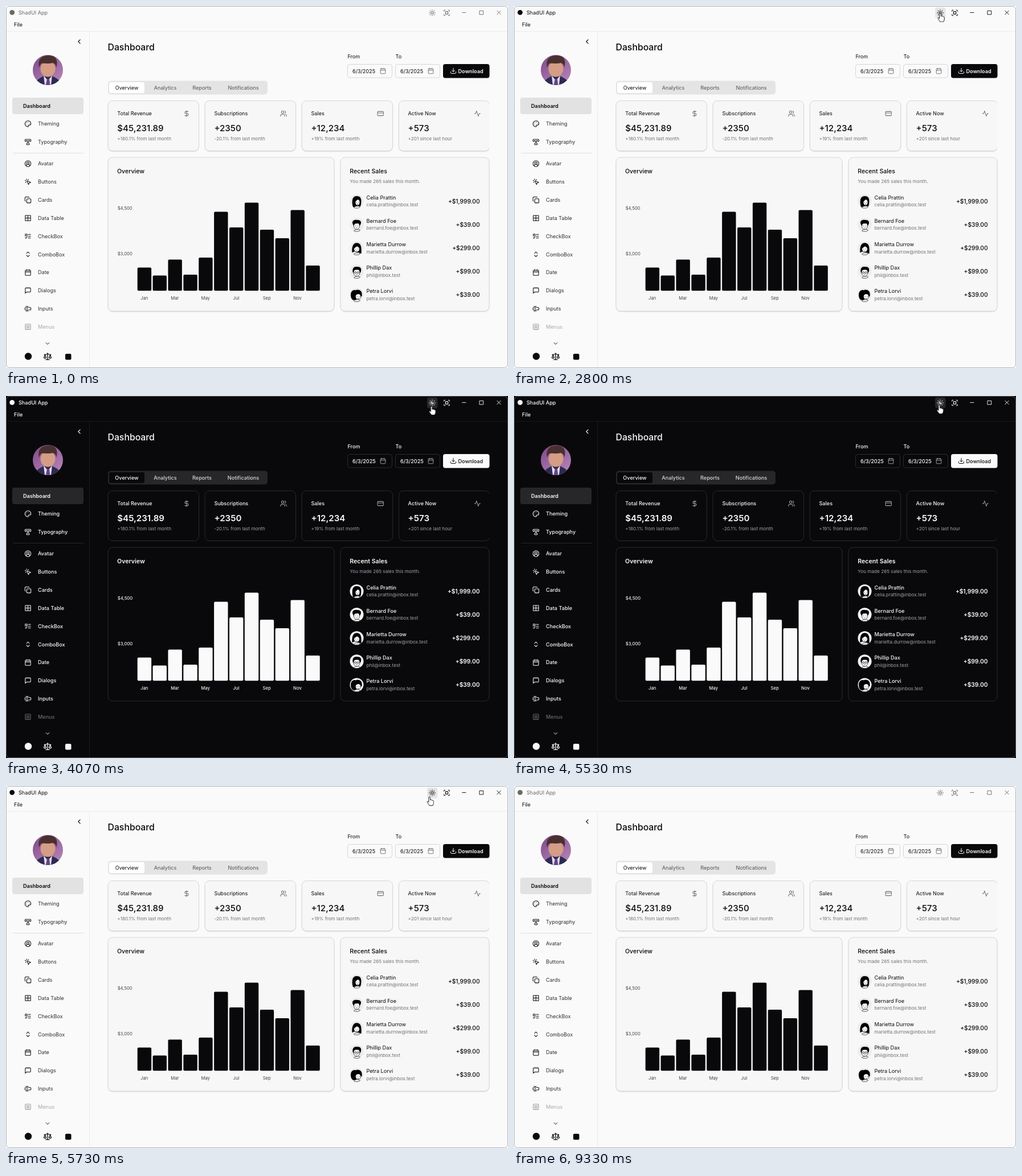
An HTML page for the animation above (9800 ms loop, 881 by 636 pixels).

```html
<!DOCTYPE html>
<html lang="en">
<head>
<meta charset="utf-8">
<title>Dashboard</title>
<style>
html, body { margin: 0; width: 100%; height: 100%; overflow: hidden; }
svg { display: block; width: 881px; height: 636px; font: 400 9.1px Inter, "Open Sans", sans-serif; animation: theme 9.8s step-end infinite; }
text { fill: var(--fg); font-weight: var(--body); }
.nav { fill: var(--nav); }
.small { font-size: 8.2px; font-weight: 400; fill: var(--mut); }
.axis { font-size: 7.7px; fill: var(--axis); }
.h1 { font-size: 15.8px; font-weight: 500; }
.h2 { font-size: 10.6px; font-weight: var(--head); }
.big { font-size: 15.1px; font-weight: var(--head); }
.sum { font-size: 10.2px; font-weight: var(--head); }
.mid { text-anchor: middle; }
.end { text-anchor: end; }
.bold { font-weight: 600; }
.inv { fill: var(--bg); font-weight: var(--button); }
.ic { fill: none; stroke: var(--fg); stroke-width: 2; stroke-linecap: round; stroke-linejoin: round; }
.ic.soft { stroke: var(--mut); }
.ic.flip { stroke: var(--bg); }
.fg { fill: var(--fg); }
.card { fill: var(--card); stroke: var(--edge); }
.shade { fill: var(--shade); }
.line { fill: none; stroke: var(--line); }
.field { fill: var(--bg); stroke: var(--edge); }
.faded { opacity: .4; }

.focus { animation: focus 9.8s step-end infinite; }
.hover { fill: var(--hover); animation: hover 9.8s step-end infinite; }
.sun { animation: sun 9.8s step-end infinite; }
.moon { animation: moon 9.8s step-end infinite; }
.dusk { animation: dusk 9.8s step-end infinite; }
.pick { animation: pick 9.8s linear infinite; }
.cursor { animation: move 9.8s linear infinite, show 9.8s step-end infinite; }
.arrow { animation: arrow 9.8s step-end infinite; }
.hand { animation: hand 9.8s step-end infinite; }
.cursor path { fill: #fff; stroke: #000; stroke-width: .9; stroke-linejoin: round; }

@keyframes theme {
  0%, 57.14%, 100% {
    --bg: #fafafa; --fg: #09090b; --nav: #2f2f34; --mut: #71717a; --axis: #45454c;
    --card: #f7f7f7; --edge: #d6d6d9; --shade: #00000016; --line: #ececee; --rule: #dedee0;
    --tab: #e4e4e5; --tabon: #fff; --tabfg: #52525b; --hover: #e6e6e7; --win: #b4b4b4; --face: #ebebeb;
    --body: 400; --head: 500; --button: 600;
  }
  29.28% {
    --bg: #09090b; --fg: #fafafa; --nav: #fafafa; --mut: #a1a1aa; --axis: #f0f0f2;
    --card: #09090b; --edge: #2b2b2f; --shade: #0000; --line: #18181b; --rule: #27272a;
    --tab: #27272a; --tabon: #09090b; --tabfg: #dadade; --hover: #27272a; --win: #5a5a5c; --face: #f4f4f5;
    --body: 500; --head: 600; --button: 500;
  }
}
@keyframes focus { 0%, 95.2%, 100% { opacity: .6 } 27.85% { opacity: 1 } }
@keyframes hover { 0%, 95.2%, 100% { opacity: 0 } 27.85% { opacity: 1 } }
@keyframes sun { 0%, 57.14%, 100% { opacity: 1 } 29.28% { opacity: 0 } }
@keyframes moon { 0%, 40.8%, 100% { opacity: 0 } 29.28% { opacity: 1 } }
@keyframes dusk { 0%, 57.14%, 100% { opacity: 0 } 40.8% { opacity: 1 } }
@keyframes pick {
  0%, 29.279% { fill: #e2e2e2 }
  29.28% { fill: #121214 }
  31%, 57.139% { fill: #27272a }
  57.14% { fill: #f7f7f7 }
  58.47%, 100% { fill: #e2e2e2 }
}
@keyframes show { 0%, 87.04%, 100% { opacity: 0 } 8.16% { opacity: 1 } }
@keyframes arrow { 0%, 83.4%, 100% { opacity: 1 } 22% { opacity: 0 } }
@keyframes hand { 0%, 83.4%, 100% { opacity: 0 } 22% { opacity: 1 } }
@keyframes move {
  0%, 8.16% { transform: translate(154.5px, 618px); animation-timing-function: cubic-bezier(.4, 0, .4, 1) }
  17.65%, 18.37% { transform: translate(707.5px, 45.5px); animation-timing-function: ease-in-out }
  23.16%, 29.9% { transform: translate(748px, 12.5px) }
  33.98%, 36.02% { transform: translate(746.5px, 17px) }
  37.1% { transform: translate(747px, 25.5px) }
  38.06%, 39.49% { transform: translate(747px, 19.5px) }
  44.18%, 57.14% { transform: translate(746.2px, 16px) }
  58.47%, 82.96% { transform: translate(743.2px, 19px); animation-timing-function: ease-in }
  86.4%, 100% { transform: translate(121.5px, 600px) }
}
</style>
</head>
<body>
<svg id="app" viewBox="0 0 881 636"></svg>
<script>
const box = 'a2 2 0 0 1 2 2v14a2 2 0 0 1-2 2H5a2 2 0 0 1-2-2V';
const rays = 'M12 2v2M12 20v2M4.9 4.9l1.4 1.4M17.7 17.7l1.4 1.4M2 12h2M20 12h2M6.3 17.7l-1.4 1.4M19.1 4.9l-1.4 1.4';
const ring = (x, y, r) => `M${x - r} ${y}a${r} ${r} 0 1 0 ${2 * r} 0a${r} ${r} 0 1 0 ${-2 * r} 0`;
const icons = {
  palette: 'M13.5 6.5h.01M17.5 10.5h.01M8.5 7.5h.01M6.5 12.5h.01M12 2C6.5 2 2 6.5 2 12s4.5 10 10 10c.9 0 1.6-.7 1.6-1.7 0-1-.8-1.2-.8-2.2 0-1 .7-1.7 1.7-1.7h2c3 0 5.5-2.5 5.5-5.5C22 6 17.5 2 12 2z',
  type: 'M14 16.5a.5.5 0 0 0 .5.5h.5a2 2 0 0 1 0 4H9a2 2 0 0 1 0-4h.5a.5.5 0 0 0 .5-.5v-9a.5.5 0 0 0-.5-.5h-3a.5.5 0 0 0-.5.5V8a2 2 0 0 1-4 0V5a2 2 0 0 1 2-2h16a2 2 0 0 1 2 2v3a2 2 0 0 1-4 0v-.5a.5.5 0 0 0-.5-.5h-3a.5.5 0 0 0-.5.5Z',
  user: 'M18 20a6 6 0 0 0-12 0' + ring(12, 10, 4) + ring(12, 12, 10),
  click: 'M14 4.1 12 6M5.1 8l-2.9-.8M6 12l-1.9 2M7.2 2.2 8 5.1M9 9.7a.5.5 0 0 1 .7-.7l11 4.5a.5.5 0 0 1-.1 1l-4.3 1a1 1 0 0 0-.8.8l-1 4.3a.5.5 0 0 1-1 .1z',
  copy: 'M10 8h10a2 2 0 0 1 2 2v10a2 2 0 0 1-2 2H10a2 2 0 0 1-2-2V10a2 2 0 0 1 2-2zM4 16c-1.1 0-2-.9-2-2V4c0-1.1.9-2 2-2h10c1.1 0 2 .9 2 2',
  table: 'M3 3h18v18H3zM12 3v18M3 12h18',
  todo: 'M3 5h6v6H3zM3 17l2 2 4-4M13 6h8M13 12h8M13 18h8',
  updown: 'M7 15l5 5 5-5M7 9l5-5 5 5',
  calendar: 'M8 2v4M16 2v4M3 10h18M5 4h14' + box + '6a2 2 0 0 1 2-2z',
  message: 'M21 15a2 2 0 0 1-2 2H7l-4 4V5a2 2 0 0 1 2-2h14a2 2 0 0 1 2 2z',
  input: 'M5 4h1a3 3 0 0 1 3 3 3 3 0 0 1 3-3h1M13 20h-1a3 3 0 0 1-3-3 3 3 0 0 1-3 3H5M5 16H4a2 2 0 0 1-2-2v-4a2 2 0 0 1 2-2h1M13 8h7a2 2 0 0 1 2 2v4a2 2 0 0 1-2 2h-7M9 7v10',
  menu: 'M5 3h14' + box + '5a2 2 0 0 1 2-2zM7 8h10M7 12h10M7 16h10',
  scales: 'M16 16l3-8 3 8c-1.8 1.3-4.2 1.3-6 0ZM2 16l3-8 3 8c-1.8 1.3-4.2 1.3-6 0ZM7 21h10M12 3v18M3 7h2c2 0 5-1 7-2 2 1 5 2 7 2h2',
  dollar: 'M12 2v20M17 5H9.5a3.5 3.5 0 0 0 0 7h5a3.5 3.5 0 0 1 0 7H6',
  users: 'M16 21v-2a4 4 0 0 0-4-4H6a4 4 0 0 0-4 4v2M22 21v-2a4 4 0 0 0-3-3.9M16 3.1a4 4 0 0 1 0 7.8' + ring(9, 7, 4),
  credit: 'M4 5h16a2 2 0 0 1 2 2v10a2 2 0 0 1-2 2H4a2 2 0 0 1-2-2V7a2 2 0 0 1 2-2zM2 10h20',
  activity: 'M22 12h-4l-3 9L9 3l-3 9H2',
  download: 'M21 15v4a2 2 0 0 1-2 2H5a2 2 0 0 1-2-2v-4M7 10l5 5 5-5M12 15V3',
  full: 'M3 7V5a2 2 0 0 1 2-2h2M17 3h2a2 2 0 0 1 2 2v2M21 17v2a2 2 0 0 1-2 2h-2M7 21H5a2 2 0 0 1-2-2v-2M8 8h8v8H8z',
  sun: ring(12, 12, 4) + rays,
  moon: 'M12 3a6 6 0 0 0 9 9 9 9 0 1 1-9-9Z',
  dusk: 'M12 8a2.8 2.8 0 0 0 4 4 4 4 0 1 1-4-4' + rays,
  left: 'M15 18l-6-6 6-6',
  down: 'M6 9l6 6 6-6',
  min: 'M5 12h14',
  max: 'M5 5h14v14H5z',
  close: 'M5 5l14 14M19 5 5 19'
};

const text = (x, y, s, cls = '') => `<text x="${x}" y="${y}" class="${cls}">${s}</text>`;
const rect = (x, y, w, h, r, attr) => `<rect x="${x}" y="${y}" width="${w}" height="${h}" rx="${r}" ${attr}/>`;
const line = (d, color = 'line') => `<path d="${d}" class="line" style="stroke:var(--${color})"/>`;
const icon = (name, x, y, size = 12.4, cls = '') =>
  `<path d="${icons[name]}" class="ic ${cls}" transform="translate(${x - size / 2} ${y - size / 2}) scale(${size / 24})"/>`;
const card = (x, y, w, h) => rect(x - .5, y + 1, w + 1, h + 1, 9, 'class="shade"') + rect(x, y, w, h, 8, 'class="card"');

function titleBar() {
  return rect(739, 2.5, 18.5, 19, 4, 'class="hover"') +
    '<g class="focus"><circle cx="10.7" cy="11.3" r="4.4" class="fg"/>' + text(22, 14.7, 'ShadUI App') +
    ['sun', 'moon', 'dusk'].map(n => icon(n, 748, 12, 12.8, n)).join('') +
    icon('full', 773.5, 12, 12.8) + icon('min', 803.8, 11.5, 11) + icon('max', 834.5, 11.7, 11) + icon('close', 865, 11.5, 11) +
    '</g>' + text(14, 36, 'File') + line('M1 44.5H880M146.5 45V635');
}

function portrait() {
  return `<g clip-path="url(#round)"><rect x="46" y="85" width="55" height="55" fill="url(#mauve)"/>
    <path d="M50 141C51 130 59 127 66 123L81 123C89 127 96 130 98 141Z" fill="#2e2b52"/>
    <path d="M66 122L73.5 131 81 122 79 139H68Z" fill="#e4dcea"/><path d="M72 128h4l1.5 12h-8z" fill="#65438c"/>
    <ellipse cx="73.5" cy="110.5" rx="13" ry="14" fill="#d59c86"/>
    <path d="M58 108C55 93 63 87 75 87S92 94 88.5 108C87 103 86 101 82 100 74 102 66 100 62 101 60 103 59 105 58 108Z" fill="#49302f"/></g>`;
}

function sidebar() {
  const items = ['Avatar user', 'Buttons click', 'Cards copy', 'Data_Table table', 'CheckBox todo', 'ComboBox updown',
    'Date calendar', 'Dialogs message', 'Inputs input', 'Menus menu'];
  const row = (s, y) => {
    const [label, name] = s.split(' ');
    return `<g class="${label == 'Menus' ? 'faded' : ''}">` + icon(name, 38.5, y) + text(56, y + 3.3, label.replace('_', ' '), 'nav') + '</g>';
  };
  return icon('left', 128.5, 62.5, 13.5) + portrait() +
    rect(11, 161, 125, 29, 4, 'class="pick"') + text(30, 178.5, 'Dashboard', 'bold') +
    row('Theming palette', 207) + row('Typography type', 239) + line('M12 258.5H136', 'rule') +
    items.map((s, i) => row(s, 277 + 31.86 * i)).join('') +
    icon('down', 73, 593, 11.5) + '<circle cx="39" cy="615.5" r="6.2" class="fg"/>' +
    icon('scales', 73, 615.5, 15.5) + rect(104, 611, 10.5, 10.5, 2, 'class="fg"');
}

function header() {
  const date = (x, label) => text(x, 92, label) + rect(x, 102.5, 78, 23.5, 4, 'class="field"') +
    text(x + 8.5, 117.5, '6/3/2025') + icon('calendar', x + 62, 114, 11.5, 'soft');
  const tabs = [[212, 'Overview'], [279.5, 'Analytics'], [344, 'Reports'], [416.5, 'Notifications']];
  return text(178.5, 77.7, 'Dashboard', 'h1') + date(599.5, 'From') + date(683.5, 'To') +
    rect(767, 102, 81.5, 24.5, 4, 'class="fg"') + icon('download', 785, 114, 12, 'flip') + text(793.5, 117.5, 'Download', 'inv') +
    rect(179, 131.5, 280, 24, 5, 'style="fill:var(--tab)"') + rect(181, 134, 62, 19, 3, 'style="fill:var(--tabon)"') +
    tabs.map(([x, s], i) => `<text x="${x}" y="146.8" class="mid" style="fill:var(--${i ? 'tabfg' : 'fg'})">${s}</text>`).join('');
}

function stats() {
  const list = [
    ['Total Revenue', '$45,231.89', '+180.1% from last month', 'dollar'],
    ['Subscriptions', '+2350', '-20.1% from last month', 'users'],
    ['Sales', '+12,234', '+19% from last month', 'credit'],
    ['Active Now', '+573', '+201 since last hour', 'activity']];
  return '<g clip-path="url(#view)">' + list.map(([name, value, note, pic], i) => {
    const x = 179 + 170.1 * i;
    return card(x, 166.5, 159.5, 88) + text(x + 16.3, 192.4, name) + text(x + 16.3, 220.4, value, 'big') +
      text(x + 16.3, 235.8, note, 'small') + icon(pic, x + 138, 189, 12.4, 'soft');
  }).join('') + '</g>';
}

function chart() {
  const tops = [459.5, 473.5, 445.5, 472, 442, 361.5, 389, 345.5, 393, 408, 358.5, 456];
  const bars = tops.map((y, i) => rect(230.7 + 26.88 * i, y, 24.4, 500.3 - y, 2, 'class="fg"')).join('');
  const months = ['Jan', 'Mar', 'May', 'Jul', 'Sep', 'Nov'].map((m, i) => text(242.7 + 53.75 * i, 516.2, m, 'axis mid')).join('');
  return card(179, 266, 397, 270) + text(195, 293.5, 'Overview', 'h2') +
    text(195.7, 358, '$4,500', 'axis') + text(195.7, 437.8, '$3,000', 'axis') + bars + months;
}

// Each head: hair behind, face ellipse, fringe, all around 0,0.
const heads = [
  ['M-7 9C-9-1-8-9 0-9S9-3 7 8L3 11H-5Z', [1.5, 2, 4, 5.2], 'M-3 1C0-1 2-3 2.5-5 5-4 6-1 6 2L7-3 1-8-4-4Z'],
  ['M-7-1C-9-7-4-9 1-8 5-9 9-6 7-1L5 3H-5Z', [0, 2.5, 5, 6], 'M-6 0C-3-3 3-1 6-3L6-6-5-6Z'],
  ['M-8 8C-9-5-5-9 0-9 7-9 9-3 8 10L4 8-4 6Z', [0, 2, 4.8, 5], 'M-5 1C-2-1 1-4 2-5 3-3 5-1 6 1L6-5-3-7Z'],
  ['M-7 1C-8-6-4-9 1-8 7-9 9-4 7 1L5 4H-5Z', [0, 2, 5.5, 6.5], 'M-6-1C-2-4 2-2 6-3L4-6-4-6Z'],
  ['M-10 4C-12-3-8-10-2-8 3-11 10-7 9-1 10 2 8 3 7 4L-3 9C-7 10-9 8-10 4Z', [2.5, 3, 4.5, 5], 'M-3 2C-1-2 4-1 7-1L6-5-3-4Z']
];
function head([hair, [x, y, rx, ry], fringe], i, cy) {
  const eyes = i == 3 ? ring(-2.2, 2, 1.6) + ring(2.2, 2, 1.6) : `M${x - 2.4} ${y}h1.2M${x + 1.4} ${y}h1.2`;
  return `<g transform="translate(615.5 ${cy})"><circle r="12" style="fill:var(--face)"/>
    <path d="${hair}"/><path d="M-5 11C-3 8 4 8 6 10L3 12H-3Z" fill="#fff" stroke="#111" stroke-width=".7"/>
    <ellipse cx="${x}" cy="${y}" rx="${rx}" ry="${ry}" fill="#fff" stroke="#111" stroke-width=".7"/>
    <path d="${fringe}"/><path d="${eyes}M${x - 1} ${y + 3}q1 .8 2.2 0" fill="none" stroke="#111" stroke-width=".8"/></g>`;
}

function sales() {
  const people = [
    ['Celia Prattin', 'celia.prattin', '1,999'], ['Bernard Foe', 'bernard.foe', '39'],
    ['Marietta Durrow', 'marietta.durrow', '299'], ['Phillip Dax', 'phil', '99'], ['Petra Lorvi', 'petra.lorvi', '39']];
  return card(587, 266, 261, 270) + text(603.3, 293.5, 'Recent Sales', 'h2') +
    text(603.3, 311.2, 'You made 265 sales this month.', 'small') +
    people.map(([name, mail, sum], i) => {
      const y = 343 + 41.1 * i;
      return head(heads[i], i, y) + text(632.5, y - 3, name) + text(632.5, y + 9.3, mail + '@inbox.test', 'small') +
        text(831.5, y + 3.6, `+$${sum}.00`, 'sum end');
    }).join('');
}

const cursor = `<g class="cursor">
  <path class="arrow" d="M0 0V12.5L2.9 9.8 4.7 13.8 6.6 13 4.8 9.1H8.8Z"/>
  <path class="hand" d="M-1.3 1.2C-1.3-.4 1.3-.4 1.3 1.2V5.5C1.8 4.6 3.4 4.8 3.5 6 4.2 5.2 5.5 5.6 5.6 6.7 6.4 6.2 7.3 6.8 7.3 7.8V10.5C7.3 13 6 13.5 5.8 15.3H-.3C-.6 13.8-2.6 12-3.8 9.8-4.6 8.2-3 7.4-2.2 8.4L-1.3 9.5Z"/></g>`;

document.getElementById('app').innerHTML = `<defs>
  <clipPath id="round"><circle cx="73.5" cy="112.5" r="26.5"/></clipPath>
  <clipPath id="view"><rect x="170" y="160" width="678" height="100"/></clipPath>
  <linearGradient id="mauve" x2=".7" y2="1"><stop stop-color="#7d4689"/><stop offset="1" stop-color="#b583b6"/></linearGradient></defs>
  <rect width="881" height="636" style="fill:var(--bg)"/>` +
  titleBar() + sidebar() + header() + stats() + chart() + sales() +
  rect(.5, .5, 880, 635, 6, 'fill="none" style="stroke:var(--win)"') + cursor;
</script>
</body>
</html>
```
